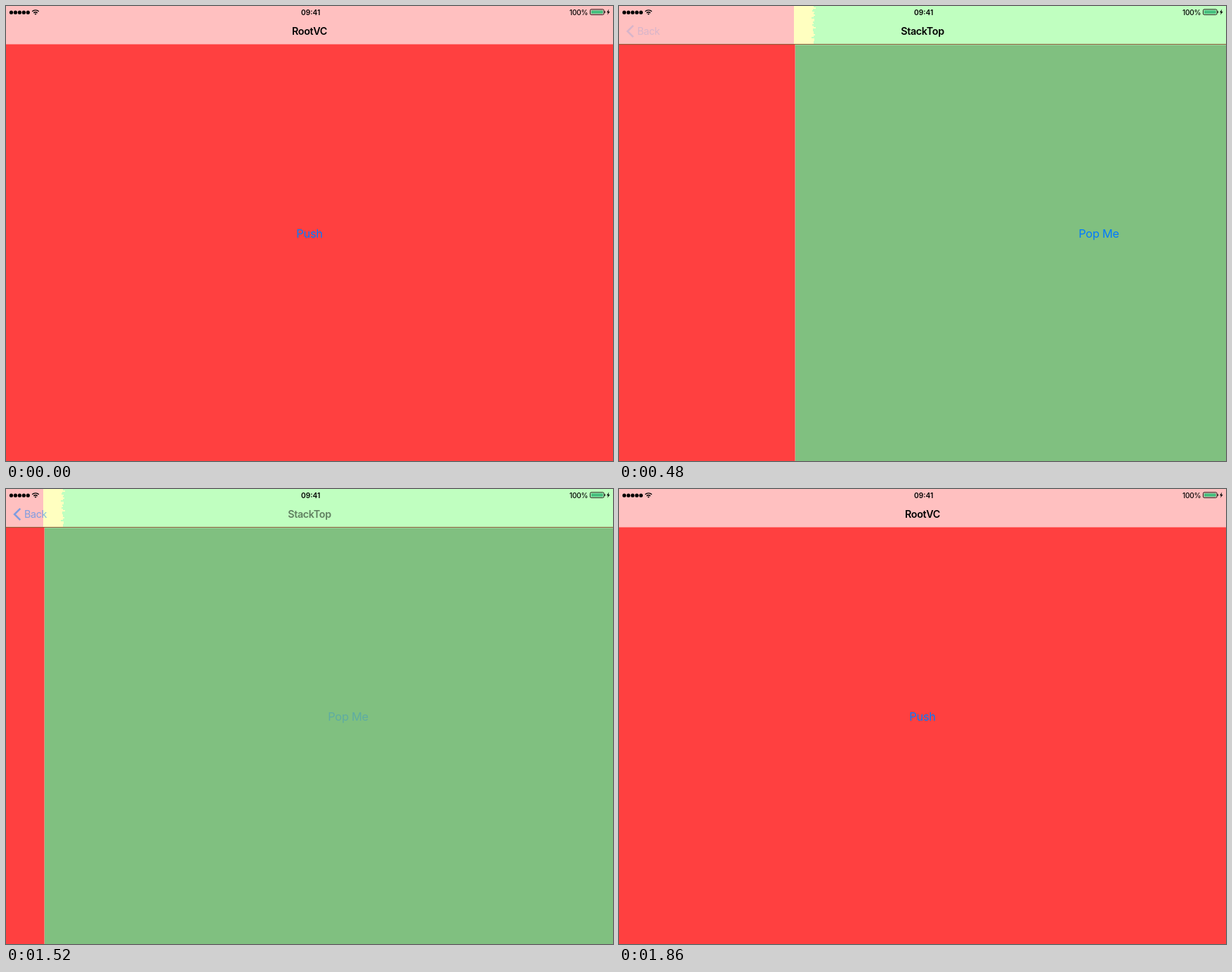
An HTML page with a canvas for the animation above (2040 ms loop, 864 by 648 pixels).

```html
<!DOCTYPE html>
<html lang="en">
<head>
<meta charset="utf-8">
<title>Push and pop</title>
<style>
  html, body { margin: 0; width: 100%; height: 100%; overflow: hidden; background: #ff4040; }
  canvas { display: block; width: 864px; height: 648px; }
</style>
</head>
<body>
<canvas id="stage" width="864" height="648"></canvas>
<script>
const W = 864, H = 648, BAR = 54, LOOP = 2040;
const ctx = document.getElementById('stage').getContext('2d');
const BLUE = '#007aff';
const rootPage = { bar: '#ffc0c0', body: '#ff4040' };
const topPage = { bar: '#c0ffc0', body: '#80c080' };

const ramp = (t, from, to) => Math.min(1, Math.max(0, (t - from) / (to - from)));

// cubic-bezier(.42, 0, .58, 1)
function ease(x) {
  if (x <= 0 || x >= 1) return x;
  let lo = 0, hi = 1, s = x;
  for (let i = 0; i < 24; i++) {
    s = (lo + hi) / 2;
    const r = 1 - s;
    if (1.26 * s * r * r + 1.74 * s * s * r + s * s * s < x) lo = s; else hi = s;
  }
  return s * s * (3 - 2 * s);
}

// A pressed button dims, then recovers after release.
function pressed(t, down, release) {
  return 1 - 0.8 * ramp(t, down, down + 40) + 0.8 * ease(ramp(t, release, release + 470));
}

function rect(color, x, y, w, h) {
  ctx.fillStyle = color;
  ctx.fillRect(x, y, w, h);
}

function label(str, x, y, size, weight, color, alpha = 1, align = 'center', spacing = 0) {
  if (alpha <= 0) return;
  ctx.globalAlpha = alpha;
  ctx.font = `${weight} ${size}px Inter, "Liberation Sans", sans-serif`;
  ctx.letterSpacing = spacing + 'px';
  ctx.textAlign = align;
  ctx.fillStyle = color;
  ctx.fillText(str, x, y);
  ctx.globalAlpha = 1;
}

function path(points) {
  ctx.beginPath();
  points.forEach(([x, y]) => ctx.lineTo(x, y));
}

function drawPages(edge, pushAlpha, popAlpha) {
  rect(rootPage.body, 0, BAR, edge, H - BAR);
  rect(topPage.body, edge, BAR, W - edge, H - BAR);
  if (edge > 0 && edge < W) rect('rgba(255,225,205,.4)', edge - 1, BAR, 1, H - BAR);
  label('Push', edge - W / 2, 330, 16.4, 400, BLUE, pushAlpha, 'center', -0.3);
  label('Pop Me', edge + W / 2, 330, 16.4, 400, BLUE, popAlpha, 'center', -0.3);
}

function drawBar(edge) {
  rect(rootPage.bar, 0, 0, edge, BAR);
  rect(topPage.bar, edge, 0, W - edge, BAR);
  if (edge > 0 && edge < W) {
    // Blurred seam between the two tints
    for (let y = 0; y < BAR; y += 2) {
      const wobble = Math.round(3 * Math.sin(y * 0.9) * Math.sin(y * 0.23 + 1));
      rect('#ffffc0', edge - 2, y, 28 + wobble, 2);
    }
  }
  if (edge >= W) {
    rect('#ff8080', 0, BAR, W, 1);
  } else {
    rect('#8a6038', 0, BAR, W, 1);
    rect('#a4d0a0', edge, BAR + 1, W - edge, 1);
  }
}

function drawBack(alpha) {
  if (alpha <= 0) return;
  ctx.globalAlpha = alpha;
  ctx.strokeStyle = BLUE;
  ctx.lineWidth = 2.6;
  path([[20.3, 27.8], [12.1, 36], [20.3, 44.2]]);
  ctx.stroke();
  label('Back', 26, 41, 14.34, 400, BLUE, alpha, 'left', -0.35);
}

function drawTitle(str, alpha) {
  label(str, W / 2, 41, 14.34, 600, '#000', alpha, 'center', -0.35);
}

function drawStatus() {
  ctx.fillStyle = '#000';
  for (let i = 0; i < 5; i++) {
    ctx.beginPath();
    ctx.arc(7.5 + i * 5.95, 9.2, 2.6, 0, 7);
    ctx.fill();
  }

  const a = Math.PI / 4;
  ctx.strokeStyle = '#000';
  ctx.lineWidth = 1.4;
  for (const r of [3.8, 6.7]) {
    ctx.beginPath();
    ctx.arc(42, 12.6, r, -3 * a, -a);
    ctx.stroke();
  }
  ctx.beginPath();
  ctx.moveTo(42, 12.8);
  ctx.arc(42, 12.8, 2.1, -3 * a, -a);
  ctx.fill();

  label('09:41', 433.7, 12.8, 10.2, 600, '#000');
  label('100%', 828.4, 12.8, 10.1, 500, '#000', 1, 'right', -0.2);

  ctx.lineWidth = 0.9;
  ctx.beginPath();
  ctx.roundRect(831.5, 4.8, 19.6, 7.6, 1.6);
  ctx.stroke();
  rect('#48c080', 832.9, 6.2, 16.8, 4.8);
  rect('#000', 851.9, 7.2, 1, 2.8);
  path([[858.2, 4.6], [855, 9.2], [857, 9.2], [856, 12.8], [859.6, 7.9], [857.5, 7.9]]);
  ctx.fill();
}

function draw(t) {
  const shown = ease(ramp(t, 255, 614)) - ease(ramp(t, 1456, 1816));
  const edge = Math.round(W * (1 - shown));
  const gone = ramp(t, 1420, 1620);

  drawPages(edge, pressed(t, 0, 240), pressed(t, 1220, 1420));
  drawBar(edge);
  drawTitle('RootVC', 1 - ramp(t, 240, 440) + ramp(t, 1635, 1850));
  drawTitle('StackTop', ramp(t, 240, 440) - gone);
  drawBack(ramp(t, 450, 640) - gone);
  drawStatus();
}

function tick() {
  draw(Math.floor(performance.now() % LOOP / 20) * 20);
  requestAnimationFrame(tick);
}
tick();
</script>
</body>
</html>
```
